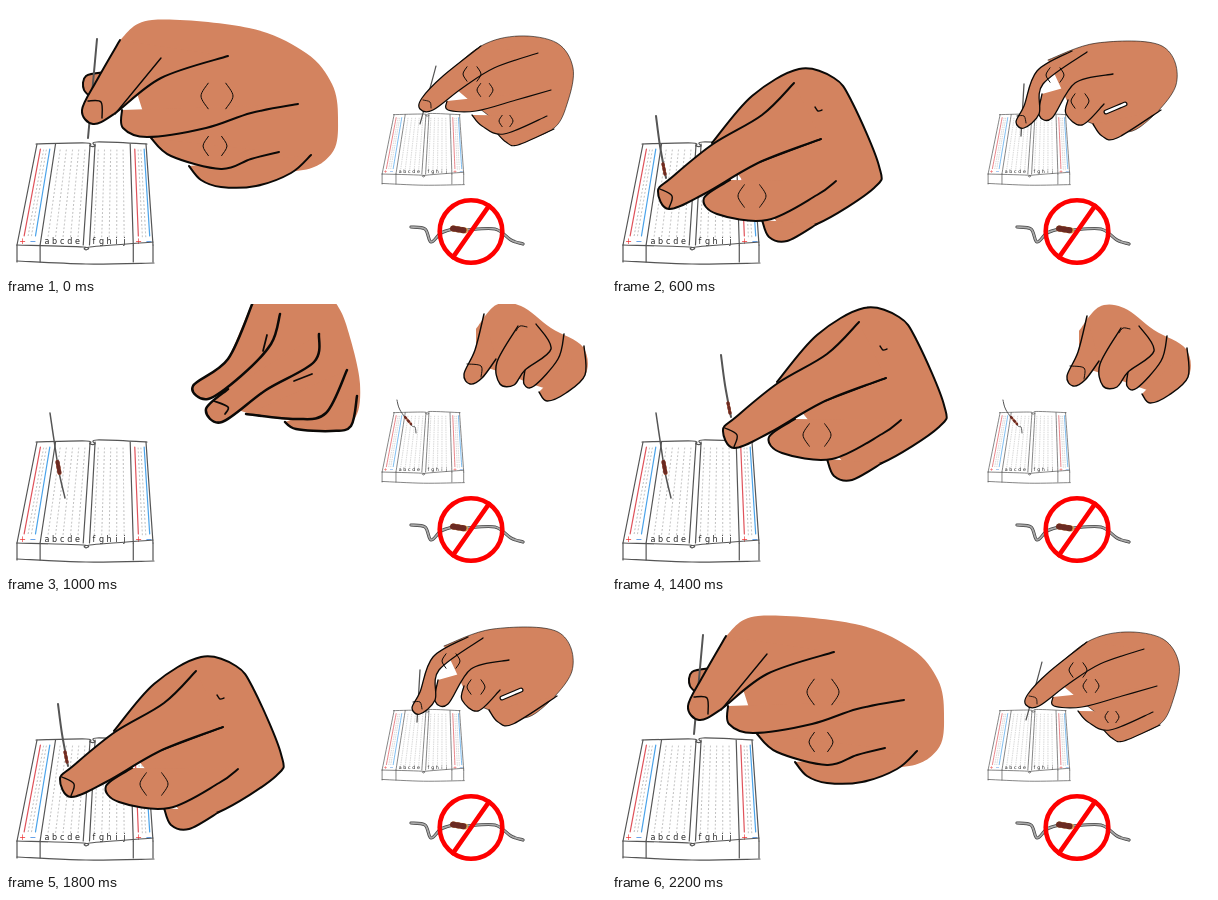
An HTML page for the animation above (2400 ms loop, 600 px wide and 270 px high).

```html
<!DOCTYPE html>
<html lang="en">
<meta charset="utf-8">
<title>Placing a resistor on a breadboard</title>
<style>
html, body { margin: 0; width: 100%; height: 100%; overflow: hidden; background: #fff }
svg { display: block; width: 100vw; height: 100vh }
path { fill: none; stroke-linecap: round; stroke-linejoin: round }
text { font: 8px "DejaVu Sans", sans-serif; text-anchor: middle }
</style>
<svg viewBox="0 0 600 270">
  <defs><g id="board"></g></defs>
  <use href="#board"/>
  <use href="#board" transform="translate(369.5 27.5) scale(.6 .588)"/>
  <g id="poses"></g>
  <g id="sign"></g>
</svg>
<script>
const SKIN = '#d3835f', INK = '#0b0907', WIRE = '#555', RED = '#fe0000', BROWN = '#a9522f';
const RAIL_RED = '#e0525a', RAIL_BLUE = '#4aa3ea';
const $ = id => document.getElementById(id);
const mix = (a, b, t) => a + (b - a) * t;

function add(parent, tag, attrs = {}, text = '') {
  const node = document.createElementNS('http://www.w3.org/2000/svg', tag);
  for (const key in attrs) node.setAttribute(key, attrs[key]);
  node.textContent = text;
  return parent.appendChild(node);
}

// Smooth open curve through "x,y x,y ..." key points.
function curve(points) {
  const p = points.split(' ').map(s => s.split(',').map(Number));
  const at = i => p[Math.max(0, Math.min(p.length - 1, i))];
  return 'M' + p[0] + p.slice(1).map((end, i) => {
    const start = p[i];
    const c1 = start.map((v, k) => v + (end[k] - at(i - 1)[k]) / 6);
    const c2 = end.map((v, k) => v - (at(i + 2)[k] - start[k]) / 6);
    return `C${c1} ${c2} ${end}`;
  }).join('');
}

const stroke = (g, width, points, color = INK, extra = {}) =>
  add(g, 'path', { d: curve(points), stroke: color, 'stroke-width': width, ...extra });

const flesh = (g, width, points) =>
  add(g, 'path', { d: curve(points), stroke: INK, 'stroke-width': width, style: `fill:${SKIN}` });

function resistor(g, width, points, color = BROWN) {
  stroke(g, width, points, color);
  stroke(g, width, points, '#6b2a22', { 'stroke-dasharray': '1.5 3', 'stroke-linecap': 'butt' });
}

function drawBoard(g) {
  const at = (u, v) => [mix(mix(31, 140, u), mix(11, 147, u), v), mix(138, 239, v)];
  const column = (u, from, to, width, color, extra) =>
    stroke(g, width, `${at(u, from)} ${at(u, to)}`, color, extra);
  const dots = u => column(u, .06, .92, 1, '#b8b8b8', { 'stroke-dasharray': '1 2.9', 'stroke-linecap': 'butt' });
  const label = (u, text, fill) => {
    const [x, y] = at(u, .99);
    add(g, 'text', { x, y, fill }, text);
  };
  const outline = points => stroke(g, 1.2, points, WIRE);

  [['abcde', .22], ['fghij', .565]].forEach(([letters, first]) =>
    [...letters].forEach((letter, i) => {
      const u = first + i * .056;
      dots(u);
      label(u, letter, '#222');
    }));
  for (const side of [0, .855]) {
    column(side + .04, .05, .91, 1.2, RAIL_RED);
    column(side + .125, .05, .91, 1.2, RAIL_BLUE);
    dots(side + .07);
    dots(side + .095);
    label(side + .04, '+', '#e33');
    label(side + .115, '−', '#27d');
  }
  for (const u of [0, .17, .487, .533, .855, 1]) column(u, 0, 1, 1.2, WIRE);
  for (const u of [0, .17, .855, 1]) {
    const [x, y] = at(u, 1);
    outline(`${x},${y} ${x},${y + 17}`);
  }
  outline('30,138 80,137 84,140 89,140 91,136 141,138');
  outline('11,239 77,241 80,244 84,241 147,236');
  outline('11,255 80,258 148,257');
}

function drawSign(g) {
  const [cx, cy, r, slope] = [465, 225.5, 31.3, 55 * Math.PI / 180];
  const [dx, dy] = [r * Math.cos(slope), r * Math.sin(slope)];
  for (const [width, color] of [[3.2, '#444'], [1.7, '#aaa']]) {
    stroke(g, width, '405,221 419,223 425,236 435,227 447,223', color);
    stroke(g, width, '461,224 489,223 505,234 517,238', color);
  }
  resistor(g, 6, '447,222.5 459,224.5', '#d9a050');
  add(g, 'circle', { cx, cy, r, fill: 'none', stroke: RED, 'stroke-width': 4.6 });
  stroke(g, 4.6, `${cx + dx},${cy - dy} ${cx - dx},${cy + dy}`, RED);
}

// A pair of skin folds, curved like parentheses around a knuckle.
function fold(g, x, y, size) {
  for (const side of [-1, 1]) {
    const bulge = x + side * size, end = x + side * size * .55;
    stroke(g, 1, `${end},${y - size * .8} ${bulge},${y} ${end},${y + size * .8}`);
  }
}

// Fingers run from the little finger to the index, each covering the last.
const hands = {
  bigHold: {
    ink: 2, edge: 0, thumb: '100,66 80,70 78,84 90,95', wire: '91,33 82,132',
    palm: '114,34 146,14 243,22 300,47 326,78 332,112 326,147 290,165 200,158 145,131',
    fingers: ['183,160 195,174 215,181 250,180 285,167 305,149', '145,132 165,150 215,163 245,153 273,146',
      '116,104 117,122 141,131 200,122 245,107 292,98', '114,34 91,74 76,104 87,118 108,108 155,72 222,50'],
    creases: ['155,52 109,108', '82,95 95,96 96,112'], folds: [[211, 90, 16], [209, 140, 12]]
  },
  smallHold: {
    ink: 1.2, edge: .6, wire: '430,60 426,75 414,118',
    palm: '437,72 475,40 513,30 551,37 567,62 562,95 548,122 515,130 470,100',
    fingers: ['490,126 500,136 512,139 548,123', '466,109 476,120 498,128 541,110',
      '441,95 442,104 470,105 510,94 545,84', '475,40 437,70 416,92 414,103 427,104 455,83 488,62 532,47'],
    creases: ['417,94 424,96 425,102'], folds: [[466, 68, 9], [479, 84, 8], [500, 115, 7]]
  },
  bigPush: {
    ink: 2.3, edge: 2.5, thumb: '110,120 60,135 64,146', wire: '71,95 64,137',
    palm: '100,125 144,72 165,55 225,53 252,80 269,130 267,165 241,197 205,215 170,212',
    fingers: ['147,210 160,226 182,232 204,220 241,197', '125,165 98,176 118,204 168,205 205,183 240,174',
      '178,78 140,110 82,139 53,148 52,167 75,174 130,164 190,136 229,124'],
    creases: ['173,78 179,76 177,83', '215,126 223,121 229,125', '152,159 157,153 163,159', '57,151 63,157 60,171'],
    folds: [[125, 142, 12], [158, 190, 13]]
  },
  smallPush: {
    ink: 1.3, edge: .6, wire: '426,84 415,134',
    palm: '449,79 487,51 545,46 573,78 553,130 515,147 462,128',
    fingers: ['498,146 508,154 540,142 553,130', '465,130 479,140 500,146 541,125',
      '441,116 446,128 479,120 537,100', '487,51 449,79 413,115 415,132 440,115 472,87 524,66'],
    creases: ['414,120 422,120 424,127', '488,118 498,119'], folds: [[459, 85, 8]]
  },
  bigPress: {
    ink: 2, edge: 2, wire: '44,110 48,140 54,172', body: '51,158 53,168',
    palm: '100,137 140,90 187,63 222,72 240,96 267,160 262,182 205,218 170,222',
    fingers: ['150,214 157,231 175,235 205,218', '118,174 92,192 105,208 155,214 205,189 224,175',
      '182,77 150,109 101,138 59,172 46,185 57,203 92,188 148,156 209,133'],
    creases: ['48,183 60,190 57,202', '148,156 209,133', '203,101 206,105 210,104'], folds: [[140, 190, 14]]
  },
  smallPress: {
    ink: 1.3, edge: .6, wire: '412,78 409,130',
    palm: '436,54 485,37 550,40 564,79 528,121 500,124 462,110',
    fingers: ['481,118 490,130 505,132 549,104', '456,94 454,108 470,119 492,98',
      '430,88 427,109 440,112 463,77 501,68', '460,45 425,65 412,100 404,116 412,122 427,108 431,78 475,46'],
    creases: ['405,110 412,110 414,117'], folds: [[443, 69, 9], [468, 95, 9]], gap: '494,106 513,98'
  },
  bigLift: {
    ink: 2.5, edge: 0,
    palm: '247,-4 222,55 207,75 230,105 300,118 345,118 354,80 340,20 328,-4',
    fingers: ['279,118 290,125 325,127 345,122 351,92', '240,110 290,115 320,109 341,66',
      '222,85 200,105 216,118 260,86 308,58 313,30', '247,-2 222,55 187,82 202,95 235,72 265,40 274,10'],
    creases: ['288,77 306,70', '208,97 222,103 219,110', '257,47 261,31'], folds: []
  },
  smallLift: {
    ink: 1.4, edge: 0,
    palm: '470,25 490,1 515,2 545,24 577,43 579,71 550,86 500,70 470,60',
    fingers: ['533,88 541,97 560,89 579,71 578,42', '519,66 518,80 528,82 552,55 558,30',
      '512,22 491,58 494,80 508,81 519,66 545,45 530,20', '478,10 469,46 458,70 464,80 476,74 490,55'],
    creases: ['510,27 514,22 521,23', '461,60 475,62 475,73'], folds: []
  }
};

function drawHand(parent, name, dx = 0, dy = 0) {
  const g = add(parent, 'g', { transform: `translate(${dx} ${dy})` });
  const { ink, edge, thumb, wire, body, palm, fingers, creases, folds, gap } = hands[name];
  if (thumb) flesh(g, ink, thumb);
  if (wire) stroke(g, ink, wire, WIRE);
  if (body) resistor(g, 3, body);
  flesh(g, edge, palm);
  fingers.forEach(points => flesh(g, ink, points));
  creases.forEach(points => stroke(g, ink * .7, points));
  folds.forEach(place => fold(g, ...place));
  if (gap) {
    stroke(g, 5, gap);
    stroke(g, 2.5, gap, '#fff');
  }
}

function drawPlacedResistors(g) {
  stroke(g, 1.5, '44,109 48,136 53,168 59,194', WIRE);
  resistor(g, 4, '51.5,158 53.5,169');
  stroke(g, 1, '391,96 394,106 405,121 409,123 410,129', WIRE);
  resistor(g, 2.4, '399,113 405,120', '#c9836a');
}

drawBoard($('board'));
drawSign($('sign'));
const poses = [
  { hands: [['bigHold'], ['smallHold']] },
  { hands: [['bigPush'], ['smallPush']] },
  { hands: [['bigPress', 8, -8], ['smallPress', 2, -10]] },
  { hands: [['bigPress'], ['smallPress']] },
  { hands: [['bigPress', 65, -59], ['smallLift', -3, 2]], placed: true },
  { hands: [['bigLift'], ['smallLift']], placed: true }
].map(pose => {
  const g = add($('poses'), 'g');
  if (pose.placed) drawPlacedResistors(g);
  pose.hands.forEach(hand => drawHand(g, ...hand));
  return g;
});

// Poses run forward, then back, one every 200 ms.
const start = performance.now();
function tick() {
  const step = Math.floor((performance.now() - start) / 200) % 12;
  const current = Math.min(step, 11 - step);
  poses.forEach((g, i) => g.style.display = i === current ? '' : 'none');
  requestAnimationFrame(tick);
}
tick();
</script>
</html>
```
